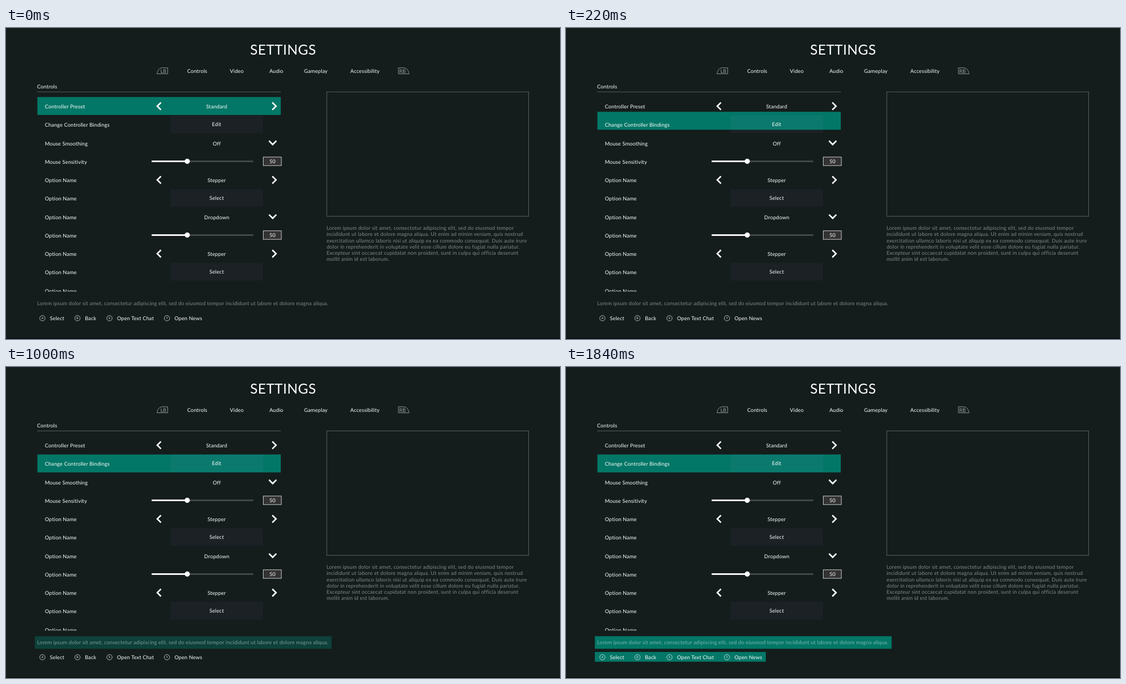
Write an HTML page that moves like this. It is 998 px wide and 561 px high and loops after 4020 ms.

```html
<!DOCTYPE html>
<html lang="en">
<head>
<meta charset="utf-8">
<title>Settings</title>
<style>
  html, body { margin: 0; width: 100%; height: 100%; overflow: hidden; background: #141d1c; }
  svg { display: block; }
  text { font: 9.36px Lato, sans-serif; letter-spacing: .02em; fill: #fff; text-rendering: geometricPrecision; }
  .mid { text-anchor: middle; }
  .title { font-size: 24.95px; }
  .dim { fill-opacity: .48; }
  .bumper { font-size: 9px; letter-spacing: 0; fill: #a4a9a8; }
  .key { font-size: 5px; letter-spacing: 0; }
  .line { fill: none; stroke: #5a6060; }
  .icon { fill: none; stroke: #a4a9a8; stroke-width: .9; }
  .ring { fill: none; stroke: #fff; stroke-width: .7; }
  .chevron { fill: none; stroke: #fff; stroke-width: 2.7; }
  .button { fill: #08040a; mix-blend-mode: screen; }
  .field { fill: #333; stroke: #ccc; }
  .glow { fill: #037767; }
  .back { fill: #141d1c; }
</style>
</head>
<body>
<svg id="stage" width="998" height="561" viewBox="0 0 998 561"></svg>
<script>
const LOOP = 4020, MOVE = 300, PITCH = 33.26, TOP = 124.5;
const lorem = [
  'Lorem ipsum dolor sit amet, consectetur adipiscing elit, sed do eiusmod tempor',
  'incididunt ut labore et dolore magna aliqua. Ut enim ad minim veniam, quis nostrud',
  'exercitation ullamco laboris nisi ut aliquip ex ea commodo consequat. Duis aute irure',
  'dolor in reprehenderit in voluptate velit esse cillum dolore eu fugiat nulla pariatur.',
  'Excepteur sint occaecat cupidatat non proident, sunt in culpa qui officia deserunt',
  'mollit anim id est laborum.'
];

const text = (x, y, s, cls = '') => `<text x="${x}" y="${y}" class="${cls}">${s}</text>`;
const rect = (x, y, w, h, attrs) => `<rect x="${x}" y="${y}" width="${w}" height="${h}" ${attrs}/>`;
const chevron = (x, y, turn) =>
  `<path class="chevron" transform="translate(${x} ${y}) rotate(${turn})" d="M3.75-6.6L-2.9 0L3.75 6.6"/>`;

// Each control is drawn around y, the middle of its row label.
const controls = {
  stepper: (y, s) => chevron(275.4, y - .6, 0) + chevron(483.5, y - .6, 180) + text(379.5, y + 3.4, s, 'mid'),
  button: (y, s) => rect(296, y - 17.3, 167, 32, 'class="button"') + text(379.5, y + 2, s, 'mid'),
  dropdown: (y, s) => chevron(480.4, y - .8, -90) + text(379.7, y + 3.4, s, 'mid'),
  slider: (y, s) => rect(262.5, y - 2.3, 183, 2.9, 'fill="#434a49"') +
    rect(262.5, y - 2.3, 64, 2.9, 'fill="#fff"') +
    `<circle cx="326.5" cy="${y - .9}" r="4.7" fill="#fff"/>` +
    rect(463.5, y - 8.6, 32.5, 15.4, 'class="field"') + text(480, y + 2.8, s, 'mid')
};

const rows = [
  ['Controller Preset', 'stepper', 'Standard'],
  ['Change Controller Bindings', 'button', 'Edit'],
  ['Mouse Smoothing', 'dropdown', 'Off'],
  ['Mouse Sensitivity', 'slider', '50'],
  ...[['stepper', 'Stepper'], ['button', 'Select'], ['dropdown', 'Dropdown'], ['slider', '50'],
    ['stepper', 'Stepper'], ['button', 'Select']].map(r => ['Option Name', ...r]),
  ['Option Name']
];
const tabs = [[344.5, 'Controls'], [415.7, 'Video'], [487, 'Audio'], [558.2, 'Gameplay'], [646.7, 'Accessibility']];
const keys = [[65.6, 'A', 'Select'], [128.7, 'B', 'Back'], [186.4, 'X', 'Open Text Chat'], [290, 'Y', 'Open News']];

document.getElementById('stage').innerHTML = [
  rect(0, 0, 998, 561, 'class="back"'),
  rect(0, 560, 998, 1, 'fill="#000"'),
  text(499.3, 48, 'SETTINGS', 'mid title'),
  '<path class="icon" d="M272 82.6C273 77 276 71.8 281.5 71.8H291.2V82.6Z"/>',
  '<path class="icon" d="M726 82.6C725 77 722 71.8 716.5 71.8H707V82.6Z"/>',
  text(283.4, 80.6, 'LB', 'mid bumper'),
  text(714.3, 80.6, 'RB', 'mid bumper'),
  ...tabs.map(([x, s]) => text(x, 80.5, s, 'mid')),
  text(56, 108.6, 'Controls'),
  '<path class="line" d="M56 115.3H495"/>',
  rect(577.9, 115.3, 363.6, 224.4, 'class="line"'),
  ...lorem.map((s, i) => text(577.4, 364.2 + 11.23 * i, s, 'dim')),
  rect(56.5, TOP, 438.5, 32.4, 'class="glow" id="cursor"'),
  ...rows.map(([label, kind, value], i) => {
    const y = 141.6 + PITCH * i;
    return text(70, y + 3.4, label) + (kind ? controls[kind](y, value) : '');
  }),
  rect(50, 475.6, 450, 9, 'class="back"'), // lower edge of the list
  rect(52, 485.6, 534.6, 22.7, 'class="glow" id="hint"'),
  rect(52, 514, 308, 17.6, 'class="glow" id="legend"'),
  text(56, 499.8, lorem[0] + ' incididunt ut labore et dolore magna aliqua.', 'dim'),
  ...keys.map(([x, key, s]) => `<circle class="ring" cx="${x}" cy="523.5" r="4.8"/>` +
    text(x, 525.3, key, 'mid key') + text(x + 13.5, 526.8, s))
].join('');

const [cursor, hint, legend] = ['cursor', 'hint', 'legend'].map(id => document.getElementById(id));

function ease(t, start) {
  const u = Math.min(1, Math.max(0, (t - start) / MOVE));
  return u < .5 ? (2 * u) ** 3.7 / 2 : 1 - (2 - 2 * u) ** 3.7 / 2;
}

const begin = performance.now();
function draw(now) {
  const t = Math.max(0, now - begin) % LOOP;
  cursor.setAttribute('y', TOP + PITCH * ease(t, 38));
  hint.setAttribute('opacity', ease(t, 860));
  legend.setAttribute('opacity', ease(t, 1538));
  requestAnimationFrame(draw);
}
draw(begin);
</script>
</body>
</html>
```
